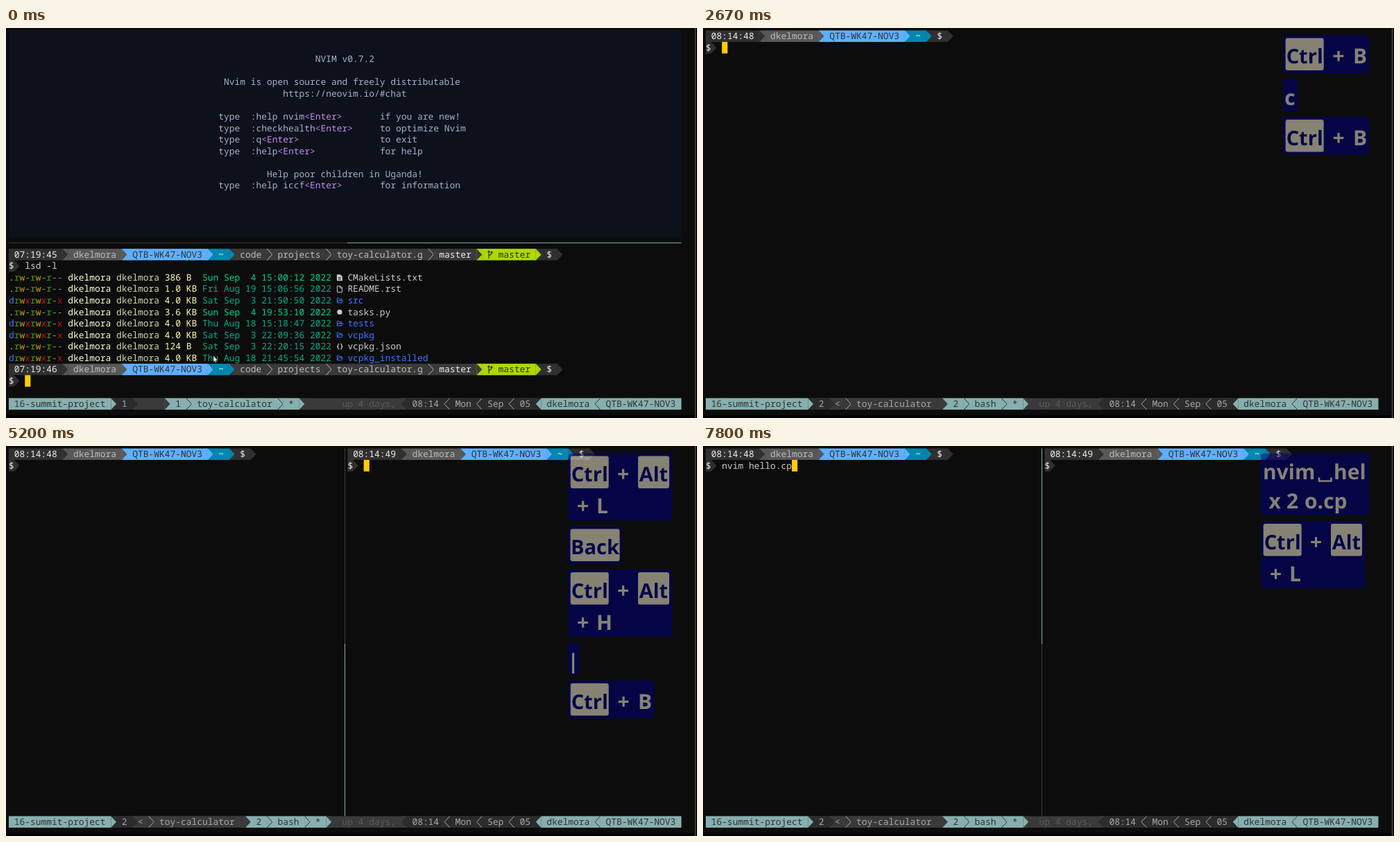
Recreate the animation shown at these times as an HTML page. Size 996x562 px, loop 8000 ms.

```html
<!DOCTYPE html>
<html lang="en">
<head>
<meta charset="utf-8">
<title>Terminal session</title>
<style>
  html, body { margin: 0; width: 100%; height: 100%; overflow: hidden; background: #0c0c0c; }
  svg { display: block; width: 996px; height: 562px; }
  text { white-space: pre; text-rendering: geometricPrecision; }
  #term text { font: 12.92px "Noto Sans Mono", "DejaVu Sans Mono", monospace; }
  #keys text { font: bold 30px "Open Sans", "Noto Sans", sans-serif; fill: cornsilk; }
  #keys .cap { font-size: 29px; fill: navy; text-anchor: middle; }
  #keys .mid { text-anchor: middle; }
</style>
</head>
<body>
<svg viewBox="0 0 996 562">
  <rect width="996" height="562" fill="#0c0c0c"/>
  <path d="M0 558H996V562H0zM994 0H996V562H994z" fill="#000"/>
  <path d="M993.5 0V562" stroke="#5a5a5a"/>
  <g id="term"></g>
  <g id="keys"></g>
</svg>
<script>
const LOOP = 8000;
const CW = 7.752, RH = 16.56;
const USER = 'dkelmora', HOST = 'QTB-WK47-NOV3';
const X = c => 4 + c * CW;
const Y = r => 3.5 + r * RH;

// ---- terminal cells ----
const esc = s => s.replace(/&/g, '&amp;').replace(/</g, '&lt;');

function text(c, r, s, fill) {
  if (!s.trim()) return '';
  const lead = s.length - s.trimStart().length;
  return `<text x="${X(c + lead)}" y="${Y(r) + 12.6}" fill="${fill}">${esc(s.trim())}</text>`;
}

// A slight overlap hides seams between neighbouring cells.
const rect = (c, r, n, fill, rows = 1) =>
  `<rect x="${X(c)}" y="${Y(r)}" width="${n * CW + .4}" height="${rows * RH}" fill="${fill}"/>`;

const cursor = (c, r) => rect(c, r, 1, '#ffcc00');

function wedge(c, r, fill, left, thin) {
  const [a, b] = left ? [X(c + 1), X(c)] : [X(c), X(c + 1)];
  const d = `M${a} ${Y(r)}L${b} ${Y(r + .5)}L${a} ${Y(r + 1)}`;
  return `<path d="${d}" ` + (thin ? `fill="none" stroke="${fill}"/>` : `fill="${fill}"/>`);
}

// Segments are [background, text colour, text]; equal neighbours get a thin divider.
function bar(c, r, segs, end = '#0c0c0c') {
  let out = '';
  segs.forEach(([bg, fg, s], i) => {
    const next = i + 1 < segs.length ? segs[i + 1][0] : end;
    out += rect(c, r, s.length, bg) + text(c, r, s, fg);
    c += s.length;
    out += rect(c, r, 1, next) + (next === bg ? wedge(c, r, fg, false, true) : wedge(c, r, bg));
    c++;
  });
  return out;
}

function barLeft(c, r, segs, before) {
  let out = '', prev = before;
  for (const [bg, fg, s] of segs) {
    out += rect(c, r, 1, prev) + (prev === bg ? wedge(c, r, fg, true, true) : wedge(c, r, bg, true));
    out += rect(++c, r, s.length, bg) + text(c, r, s, fg);
    c += s.length;
    prev = bg;
  }
  return out;
}

const DARK = '#303030', GREY = '#3a3a3a', TEAL = '#87afaf', SOFT = '#bcbcbc';

function prompt(c, r, time, path = []) {
  const segs = [
    [DARK, '#eeeeee', ` ${time} `],
    ['#585858', SOFT, ` ${USER} `],
    ['#5fafff', DARK, ` ${HOST} `],
    ['#0087af', '#ffffff', ' ~ '],
    ...path.map((p, i) => [GREY, i < path.length - 1 ? SOFT : '#eeeeee', ` ${p} `])
  ];
  if (path.length) segs.push(['#afd700', '#263000', '   master ']);
  segs.push([DARK, '#eeeeee', ' $ ']);
  let out = bar(c, r, segs) + bar(c, r + 1, [[DARK, '#eeeeee', '$']]);
  if (path.length) {
    out += `<path transform="translate(${X(c + 89)} ${Y(r)})" d="M2 3V14M6 4V7L2 10.5M.5 5L2 3 3.5 5M4.5 6L6 4 7.5 6" fill="none" stroke="#263000" stroke-width="1.2"/>`;
  }
  return out;
}

function status(num, middle) {
  const row = 32, side = '#2c2c2c', mid = GREY, txt = '#a8a8a8';
  return rect(0, row, 125, mid) +
    bar(0, row, [
      [TEAL, DARK, ' 16-summit-project '],
      [side, txt, ` ${num} `],
      ...middle(mid, txt)
    ], mid) +
    text(62, row, 'up 4 days,', '#585858') +
    barLeft(73, row, [
      ...[' 08:14 ', ' Mon ', ' Sep ', ' 05 '].map(s => [side, txt, s]),
      [TEAL, DARK, ` ${USER} `],
      [TEAL, DARK, ` ${HOST} `]
    ], mid);
}

const teal = list => list.map(s => [TEAL, DARK, s]);
const statusOne = status(1, bg => [[bg, bg, '     '], ...teal([' 1 ', ' toy-calculator ', ' * '])]);
const statusTwo = status(2, (bg, fg) => [
  [bg, fg, '< '], [bg, fg, ' toy-calculator  '], ...teal([' 2 ', ' bash ', ' * '])]);

// ---- first window ----
const INTRO = [
  [2, 57, 'NVIM v0.7.2'],
  [4, 40, 'Nvim is open source and freely distributable'],
  [5, 51, 'https://neovim.io/#chat'],
  [7, 39, 'type  :help nvim<Enter>', 'if you are new!'],
  [8, 39, 'type  :checkhealth<Enter>', 'to optimize Nvim'],
  [9, 39, 'type  :q<Enter>', 'to exit'],
  [10, 39, 'type  :help<Enter>', 'for help'],
  [12, 48, 'Help poor children in Uganda!'],
  [13, 39, 'type  :help iccf<Enter>', 'for information']
];

function intro() {
  const fg = '#a6b0cc';
  return rect(0, 0, 125, '#0d111b', 18) +
    INTRO.map(([r, c, s, note = '']) => {
      const plain = s.replace('<Enter>', '');
      return text(c, r, plain, fg) + text(69, r, note, fg) +
        (plain !== s ? text(c + plain.length, r, '<Enter>', '#c58af0') : '');
    }).join('');
}

const FILES = [
  ['.rw-rw-r--', '386 B', 'Sun Sep  4 15:00:12', 'CMakeLists.txt', 'list'],
  ['.rw-rw-r--', '1.0 KB', 'Fri Aug 19 15:06:56', 'README.rst', 'page'],
  ['drwxrwxr-x', '4.0 KB', 'Sat Sep  3 21:50:50', 'src', 'dir'],
  ['.rw-rw-r--', '3.6 KB', 'Sun Sep  4 19:53:10', 'tasks.py', 'dot'],
  ['drwxrwxr-x', '4.0 KB', 'Thu Aug 18 15:18:47', 'tests', 'dir'],
  ['drwxrwxr-x', '4.0 KB', 'Sat Sep  3 22:09:36', 'vcpkg', 'dir'],
  ['.rw-rw-r--', '124 B', 'Sat Sep  3 22:20:15', 'vcpkg.json', 'json'],
  ['drwxrwxr-x', '4.0 KB', 'Thu Aug 18 21:45:54', 'vcpkg_installed', 'dir']
];
const PERM = { '.': '#cccccc', d: '#3b78ff', r: '#4e9a06', w: '#c19c00', x: '#c50f1f', '-': '#8a8a8a' };
const ICON = {
  list: '<path d="M0 4H5L8 7V13H0z" fill="#ccc"/><path d="M2 8.5H6M2 10.8H6" stroke="#0c0c0c"/>',
  page: '<path d="M.6 4H5L7.6 6.6V13H.6zM4.8 4V7H7.6" fill="none" stroke="#ccc"/>',
  dir: '<path d="M.5 11.5V5H3L4 6.2H7V8M.5 11.5L2.2 8H8.5L7 11.5z" fill="none" stroke="#3b78ff"/>',
  dot: '<circle cx="4" cy="8.3" r="3.6" fill="#ccc"/>',
  json: '<path d="M3.2 4.5Q1.8 4.5 1.8 6V7.3L.6 8.4 1.8 9.5V11Q1.8 12.3 3.2 12.3M5.4 4.5Q6.8 4.5 6.8 6V7.3L8 8.4 6.8 9.5V11Q6.8 12.3 5.4 12.3" fill="none" stroke="#ccc" stroke-width="1.2"/>'
};

const listing = () => FILES.map(([perm, size, date, name, icon], i) => {
  const r = 21 + i, [amount, unit] = size.split(' ');
  return [...perm].map((ch, c) => text(c, r, ch, PERM[ch])).join('') +
    text(11, r, USER, '#ffffd7') + text(20, r, USER, '#d7d7af') +
    text(29, r, amount, '#ffffaf') + text(33, r, unit, '#ffffaf') +
    text(36, r, date + ' 2022', date.startsWith('Sun') ? '#00d787' : '#00af87') +
    `<g transform="translate(${X(61)} ${Y(r)})">${ICON[icon]}</g>` +
    text(63, r, name, icon === 'dir' ? '#3b78ff' : '#cccccc');
}).join('');

const line = (d, on) => `<path d="${d}" stroke="${on ? TEAL : '#3c3c3c'}"/>`;
const PATH = ['code', 'projects', 'toy-calculator.g', 'master'];
const windowOne = intro() +
  line('M4 309.7H492', false) + line('M492 309.7H973.5', true) +
  prompt(0, 19, '07:19:45', PATH) + text(3, 20, 'lsd -l', '#cccccc') + listing() +
  prompt(0, 29, '07:19:46', PATH) + cursor(3, 30) + statusOne;
const pointer = '<path d="M299 472V481.5L301 479.6 302.3 482.3 303.6 481.6 302.4 479H305z" fill="#fff" stroke="#000" stroke-width=".5"/>';

// ---- typing: [character, shown as key, echoed in shell] ----
const STROKES = [
  ['n', 5670, 5730], ['v', 5800, 5800], ['i', 5870, 5870], ['m', 6000, 6000], [' ', 6070, 6130],
  ['h', 6470, 6530], ['e', 6600, 6670], ['l', 6730, 6800], ['l', 6870, 6930],
  ['o', 7200, 7270], ['.', 7330, 7400], ['c', 7470, 7530], ['p', 7800, 7800]
];
const typed = (t, column) => STROKES.filter(s => t >= s[column]).map(s => s[0]).join('');

const leftPrompt = prompt(0, 0, '08:14:48');
const rightPrompt = prompt(63, 0, '08:14:49');

function terminal(t) {
  if (t < 1530) return windowOne + (t < 1200 ? pointer : '');
  if (t < 1730) return cursor(0, 0) + statusTwo;
  if (t < 2730) return leftPrompt + cursor(3, 1) + statusTwo;

  const leftOn = t >= 5270;
  let out = leftPrompt + statusTwo +
    line('M488.5 3.5V285', leftOn) + line('M488.5 285V533', !leftOn);
  if (t < 2930) return out + cursor(63, 0);
  out += rightPrompt;
  if (leftOn) {
    const cmd = typed(t, 2);
    return out + text(3, 1, cmd, '#cccccc') + cursor(3 + cmd.length, 1);
  }
  const stray = t >= 3470 && t < 4270;
  return out + (stray ? text(66, 1, 'ḥ', '#cccccc') : '') + cursor(stray ? 67 : 66, 1);
}

// ---- key display ----
const label = (x, y, s, cls = '') => `<text x="${x}" y="${y}" class="${cls}">${s}</text>`;
const cap = (x, w, s) =>
  `<rect x="${x}" y="4" width="${w}" height="46.5" rx="3" fill="cornsilk"/>` + label(x + w / 2, 40.7, s, 'cap');

const prefix = () => ({
  w: 124, h: 54.5, body: cap(3.7, 55, 'Ctrl') + label(80, 40.7, '+', 'mid') + label(111, 40.7, 'B', 'mid')
});
const ctrlAlt = key => () => ({
  w: 150, h: 97,
  body: cap(3.7, 55, 'Ctrl') + label(79.5, 40.7, '+', 'mid') + cap(101, 45, 'Alt') +
    label(21.5, 86.5, '+', 'mid') + label(41, 86.5, key)
});
const back = () => ({ w: 77, h: 54.5, body: cap(3.5, 71, 'Back') });
const letter = (s, w) => () => ({ w, h: 47, body: label(w / 2 - .5, 37.5, s, 'mid') });

const TYPED_W = [26, 43, 52, 81, 108, 128, 146, 156];
function typedBox(t) {
  const s = typed(t, 1), n = s.length;
  let body = label(3, 37.5, s.slice(0, 4));
  if (n > 4) body += '<path d="M84 35V40H101.5V35" fill="none" stroke="cornsilk" stroke-width="2.6"/>';
  if (n > 5) body += label(105, 37.5, s.slice(5, 8));
  if (n > 8) body += label(11.5, 79.5, 'x') + label(37, 79.5, '2') + label(63, 79.5, s.slice(9));
  return { w: TYPED_W[Math.min(n, 8) - 1], h: n > 8 ? 89.5 : 47, body };
}

const KEYS = [
  [1200, prefix], [1530, letter('c', 21)], [2670, prefix], [2730, letter('|', 16)],
  [3470, ctrlAlt('H')], [4200, back], [5200, ctrlAlt('L')], [5670, typedBox]
];
const fade = age => age < 3000 ? .5 : age < 3070 ? .4 : .2;

function keys(t) {
  const live = KEYS.filter(([at]) => t >= at && t < at + 3130)
    .map(([at, make]) => ({ ...make(t), alpha: fade(t - at) })).reverse();
  const x = 960 - Math.max(...live.map(k => k.w));
  let y = 10.5;
  return live.map(k => {
    const g = `<g transform="translate(${x} ${y})" opacity="${k.alpha}">` +
      `<rect width="${k.w}" height="${k.h}" rx="5" fill="navy"/>${k.body}</g>`;
    y += k.h + 8;
    return g;
  }).join('');
}

// ---- playback ----
const layers = [['term', terminal], ['keys', keys]].map(([id, draw]) =>
  ({ el: document.getElementById(id), draw, last: null }));

function frame() {
  const t = performance.now() % LOOP;
  for (const layer of layers) {
    const html = layer.draw(t);
    if (html !== layer.last) layer.el.innerHTML = layer.last = html;
  }
  requestAnimationFrame(frame);
}
frame();
</script>
</body>
</html>
```
